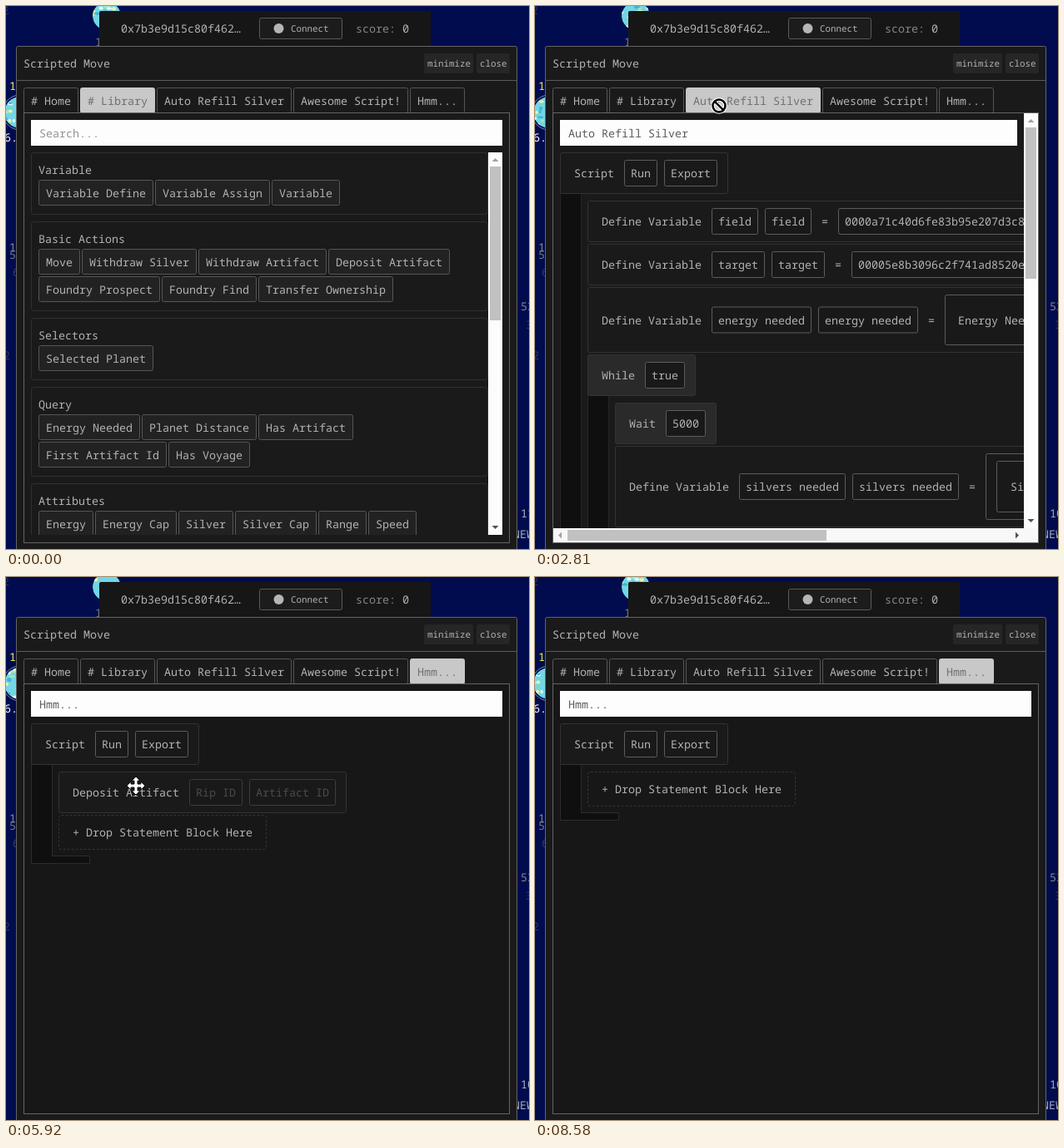
An HTML page for the animation above (8.74 s loop, 628 by 653 pixels).

```html
<!DOCTYPE html>
<html lang="en">
<head>
<meta charset="utf-8">
<title>Script panel</title>
<style>
  html, body { margin: 0; width: 100%; height: 100%; overflow: hidden; background: #000c4e; }
  svg { display: block; width: 628px; height: 653px; }
  text { font: 13.333px "Noto Sans Mono", "DejaVu Sans Mono", monospace; fill: #b2b2b2; text-rendering: geometricPrecision; }
  text.small { font-size: 10.83px; }
  .btn rect { fill: #222; stroke: #565656; }
  .tab rect { fill: #1a1a1a; stroke: #565656; }
  .tab.on rect { fill: #c8c8c8; stroke: #c8c8c8; }
  .tab.on text { fill: #707070; }
  .btn.on rect { fill: #969696; stroke: #969696; }
  .btn.on text { fill: #5a5a5a; }
  .tool rect { fill: #262626; }
  .tool.on rect { fill: #8f8f8f; }
  .tool.on text { fill: #4a4a4a; }
</style>
</head>
<body>
<svg id="stage" viewBox="0 0 628 653" xmlns="http://www.w3.org/2000/svg"></svg>
<script>
const LOOP = 8740;
const CHAR = 8;

const rect = (x, y, w, h, fill, more = '') =>
  `<rect x="${x}" y="${y}" width="${w}" height="${h}" fill="${fill}" ${more}/>`;
// Outlined box whose one-pixel border lies inside the given bounds.
const box = (x, y, w, h, fill, stroke, more = 'rx="2"') =>
  rect(x + .5, y + .5, w - 1, h - 1, fill, `stroke="${stroke}" ${more}`);
const label = (x, cy, str, fill, more = '') =>
  `<text x="${x}" y="${cy + 5}" ${fill ? `style="fill:${fill}"` : ''} ${more}>${str}</text>`;
const small = (x, cy, str) => `<text class="small" x="${x}" y="${cy + 4}">${str}</text>`;
const group = (id, body, more = '') => `<g id="${id}" ${more}>${body}</g>`;
const clip = (id, x, y, w, h) => `<clipPath id="${id}">${rect(x, y, w, h, '#000')}</clipPath>`;
const arrow = (x, y, angle, fill) =>
  `<path d="M-4 2L0-2L4 2Z" fill="${fill}" transform="translate(${x} ${y}) rotate(${angle})"/>`;

function seeded(seed) {
  return () => (seed = (seed * 16807) % 2147483647) / 2147483647;
}

// ---- Space background ----
const planets = [{ id: 'p1', x: 121, y: 12, r: 17 }, { id: 'p2', x: 17, y: 128, r: 19 }];

function planet({ id, x, y, r }, seed) {
  const rnd = seeded(seed);
  const colours = ['#f3f0a0', '#e8fbf4', '#3fb4d8', '#a8e8b8'];
  let blobs = '';
  for (let i = 0; i < 40; i++) {
    const bx = rnd() * 4 * r, by = y + (rnd() * 2 - 1) * r;
    const shape = `rx="${1.5 + rnd() * 3}" ry="${1 + rnd() * 1.6}" fill="${colours[i % 4]}"`;
    for (const shift of [0, 4 * r]) {
      blobs += `<ellipse cx="${x - r + bx - shift}" cy="${by}" ${shape}/>`;
    }
  }
  return `<clipPath id="${id}c"><circle cx="${x}" cy="${y}" r="${r}"/></clipPath>
    <g clip-path="url(#${id}c)"><circle cx="${x}" cy="${y}" r="${r}" fill="#72d6e4"/>${group(id, blobs)}</g>`;
}

const space = () => rect(0, 0, 628, 653, '#000c4e') +
  planet(planets[0], 71) + planet(planets[1], 389) +
  '<circle cx="17" cy="128" r="21" fill="none" stroke="#c8d4e8" stroke-opacity=".6"/>' +
  label(-5, 101, '.', '#fff') + label(4, 96, '11', '#f4f040') + label(-2, 158, '6.', '#fff') +
  label(-4, 5, '2', '#2b3357') + label(107, 43, '1', '#777') +
  label(4, 290, '11', '#8b8b86') + label(4, 299, '5', '#777') + label(8, 320, '6', '#333c5e') +
  label(-3, 420, '2', '#303858') + label(618, 361, '53', '#85858a') + label(624, 383, '3', '#303858') +
  label(618, 610, '11', '#a9adb5', 'id="count"') + label(609, 635, 'NEW', '#a9adb5');

const header = () => rect(112, 6, 398, 44, '#161616', 'rx="2"') +
  label(138, 27, '0x7b3e9d15c80f462…') +
  box(304, 14, 100, 26, '#1c1c1c', '#5a5a5a') +
  '<circle cx="327.5" cy="27" r="6" fill="#b5b5b5"/>' +
  small(342, 27, 'Connect') + label(420, 27, 'score:', '#858585') + label(476, 27, '0');

// ---- Window frame ----
const tabs = ['# Home', '# Library', 'Auto Refill Silver', 'Awesome Script!', 'Hmm...'];

function tabBar() {
  let x = 21;
  return tabs.map((name, i) => {
    const w = name.length * CHAR + 18;
    const body = `<path d="" />` + box(x, 98, w, 31, '') + label(x + 9, 114, name);
    x += w + 2 + (i === 0 || i === 2 ? 0 : 0);
    return group('tab' + i, body, 'class="tab"');
  }).join('');
}

const tool = (id, x, w, name) =>
  group(id, rect(x, 57, w, 24, '', 'rx="2"') + small(x + 4, 69, name), 'class="tool"');

const frame = () => box(12, 48, 602, 640, '#1a1a1a', '#646464') +
  rect(13, 89, 600, 1, '#5a5a5a') + label(21, 69, 'Scripted Move') +
  tool('minimize', 502, 59, 'minimize') + tool('close', 565, 40, 'close') +
  tabBar() + box(21, 128, 584, 518, '#171717', '#646464', '');

// ---- Library page ----
const library = [
  ['Variable', ['Variable Define', 'Variable Assign', 'Variable']],
  ['Basic Actions', ['Move', 'Withdraw Silver', 'Withdraw Artifact', 'Deposit Artifact'],
    ['Foundry Prospect', 'Foundry Find', 'Transfer Ownership']],
  ['Selectors', ['Selected Planet']],
  ['Query', ['Energy Needed', 'Planet Distance', 'Has Artifact'], ['First Artifact Id', 'Has Voyage']],
  ['Attributes', ['Energy', 'Energy Cap', 'Silver', 'Silver Cap', 'Range', 'Speed'], []]
];

function button(x, y, name) {
  const id = name.replace(/ /g, '');
  return group(id, box(x, y, name.length * CHAR + 18, 31, '') + label(x + 9, y + 16, name), 'class="btn"');
}

function libraryPage() {
  let y = 176, out = '';
  for (const [title, ...rows] of library) {
    const h = 42 + rows.length * 33;
    out += box(30, y, 549, h, '#1a1a1a', '#303030', 'rx="3"') + label(39, y + 21, title);
    rows.forEach((names, r) => {
      let x = 39;
      for (const name of names) {
        out += button(x, y + 33 + r * 33, name);
        x += name.length * CHAR + 20;
      }
    });
    y += h + 8;
  }
  return rect(22, 129, 582, 516, '#1a1a1a') + input(566, 'Search...', '#949494') +
    `<g clip-path="url(#listClip)">${out}</g>` +
    rect(579, 176, 17, 460, '#fcfcfc') + rect(581, 193, 13, 185, '#c1c1c1') +
    arrow(587.5, 185, 0, '#a0a0a0') + arrow(587.5, 627, 180, '#505050');
}

// ---- Script pages ----
const input = (w, value, fill = '#5c5c5c') => rect(30, 137, w, 31, '#fdfdfd') + label(40, 153, value, fill);

// Items in a row: plain words are labels, [name] is a field, [name, colour] a placeholder.
function statement(x, y, items, { fill = '#1a1a1a', width, h = 50 } = {}) {
  let cx = x + 13, body = '';
  const cy = y + h / 2;
  for (const item of items) {
    const isField = Array.isArray(item);
    const name = isField ? item[0] : item;
    const w = name.length * CHAR + (isField ? 16 : 8);
    if (isField) body += box(cx, cy - 16, w, 32, '#191919', item[1] ? '#3c3c3c' : '#5c5c5c');
    body += label(cx + (isField ? 8 : 4), cy, name, isField && item[1]);
    cx += w + 8;
  }
  return box(x, y, width || cx - 8 + 13 - x, h, fill, '#333') + body;
}

const scriptHead = () => statement(30, 176, ['Script', ['Run'], ['Export']]);

const foot = y => `<path d="M30.5 225.5H55.5V${y + .5}H100.5V${y + 9.5}H30.5Z" fill="#0f0f0f" stroke="#2c2c2c"/>`;

const dropZone = y => box(63, y, 250, 42, '#171717', '#343434', 'rx="3" stroke-dasharray="3 2"') +
  label(80, y + 21, '+ Drop Statement Block Here');

const emptyScript = () => foot(283) + scriptHead() + dropZone(234);

const filledScript = () => foot(335) + scriptHead() +
  statement(63, 234, ['Deposit Artifact', ['Rip ID', '#4a4a4a'], ['Artifact ID', '#4a4a4a']]) + dropZone(286);

function refillPage() {
  const define = (x, y, name, value, h) =>
    statement(x, y, ['Define Variable', [name], [name], '=', ...value], { width: 600, h });
  const bar = (x, y) => box(x, y, 26, 420, '#0f0f0f', '#262626', '');
  const body = rect(22, 129, 582, 516, '#1a1a1a') + bar(30, 225) + scriptHead() +
    define(63, 234, 'field', [['0000a71c40d6fe83b95e207d3c8145']]) +
    define(63, 286, 'target', [['00005e8b3096c2f741ad8520e9']]) +
    define(63, 338, 'energy needed', [], 79) +
    box(492, 347, 200, 61, '#191919', '#5c5c5c') + label(508, 378, 'Energy Needed') +
    bar(63, 468) + statement(63, 419, ['While', ['true']], { fill: '#2a2a2a' }) +
    statement(96, 477, ['Wait', ['5000']], { fill: '#2a2a2a' }) +
    define(96, 529, 'silvers needed', [], 98) +
    box(541, 538, 200, 80, '#191919', '#5c5c5c') + box(554, 547, 200, 62, '#191919', '#5c5c5c') +
    label(571, 578, 'Silver Cap');
  return `<g clip-path="url(#pageClip)">${body}</g>` + input(549, tabs[2]) +
    rect(587, 129, 17, 516, '#fcfcfc') + rect(22, 628, 582, 17, '#f8f8f8') +
    rect(589, 146, 13, 182, '#c1c1c1') + rect(39, 630, 311, 13, '#c1c1c1') +
    arrow(595.5, 138, 0, '#a0a0a0') + arrow(595.5, 619, 180, '#505050') +
    arrow(30, 636.5, -90, '#a0a0a0') + arrow(579, 636.5, 90, '#505050');
}

// ---- Pointer ----
const arm = 'L2-2V-6H5L0-11L-5-6H-2V-2';
const cross = 'M-2-2V-6H-5L0-11L5-6H2V-2H6V-5L11 0L6 5V2H2V6H5L0 11L-5 6H-2V2H-6V5L-11 0L-6-5V-2Z';
const ban = 'M-5.2-5.2L5.2 5.2M7.5 0A7.5 7.5 0 1 1-7.5 0A7.5 7.5 0 1 1 7.5 0';
const hand = 'M-2 1Q0-1 2 1V8Q4 7 5 9Q7 8 8 10Q10 9 11 11V16Q10 19 9 21H0Q-1 18-6 13Q-6 10-3 11L-2 12Z';

const pointers = () =>
  group('move', `<path d="${cross}" fill="#fff" stroke="#111"/>`) +
  group('ban', `<path d="${ban}" fill="none" stroke="#fff" stroke-width="4.6"/>
    <path d="${ban}" fill="none" stroke="#000" stroke-width="2.5"/>`) +
  group('hand', `<path d="${hand}" fill="#fff" stroke="#111"/><path d="M2 8V12M5 9V12M8 10V12" stroke="#111"/>`);

const track = [
  [1450, -20, 294], [1780, 270, 289], [1960, 408, 310], [2260, 408, 310], [2480, 345, 240],
  [2740, 221, 120], [3080, 221, 120], [3440, 385, 112], [3800, 400, 112], [4130, 512, 115],
  [4460, 512, 116], [4660, 408, 158], [4760, 358, 198], [4980, 165, 255], [5300, 160, 255],
  [5600, 156, 251], [5960, 156, 251], [6240, 300, 425], [6420, 300, 425], [6700, 527, 67],
  [6960, 527, 67], [7210, 545, -30]
];
const pointerSteps = [[0, ''], [1450, 'move'], [2320, 'ban'], [4920, 'move'], [6020, 'ban'], [6290, 'hand'], [7220, '']];
const pageSteps = [[0, 1], [2780, 2], [3500, 3], [4190, 4]];

const stepAt = (steps, t) => steps.filter(([start]) => start <= t).pop()[1];
const between = (t, a, b) => t >= a && t < b;

function positionAt(t) {
  const i = track.findIndex(([end]) => end > t);
  if (i <= 0) return (i ? track[track.length - 1] : track[0]).slice(1);
  const [t0, x0, y0] = track[i - 1], [t1, x1, y1] = track[i];
  const u = (t - t0) / (t1 - t0), k = u * u * (3 - 2 * u);
  return [x0 + (x1 - x0) * k, y0 + (y1 - y0) * k];
}

// ---- Assembly ----
const stage = document.getElementById('stage');
stage.innerHTML = clip('listClip', 30, 176, 549, 460) + clip('pageClip', 22, 129, 565, 499) +
  space() + header() + frame() +
  group('library', libraryPage()) + group('refill', refillPage()) +
  group('empty', emptyScript()) + group('filled', filledScript()) +
  group('field', input(566, '')) + group('pointer', pointers());

const $ = id => document.getElementById(id);
const show = (id, on) => { $(id).style.display = on ? '' : 'none'; };
const light = (id, on) => $(id).classList.toggle('on', on);

function update(t) {
  const page = stepAt(pageSteps, t);
  const filled = between(t, 5040, 6290);
  tabs.forEach((_, i) => light('tab' + i, i === page));
  show('library', page === 1);
  show('refill', page === 2);
  show('empty', page > 2 && !filled);
  show('filled', page > 2 && filled);
  show('field', page > 2);
  $('field').querySelector('text').textContent = tabs[page];
  light('DepositArtifact', between(t, 1920, 2780));
  light('minimize', between(t, 6650, 7020));
  $('count').textContent = t < 1300 ? '11' : '10';

  planets.forEach(({ id, r }) => {
    $(id).setAttribute('transform', `translate(${4 * r * t / LOOP} 0)`);
  });

  const kind = stepAt(pointerSteps, t);
  for (const id of ['move', 'ban', 'hand']) show(id, id === kind);
  $('pointer').setAttribute('transform', `translate(${positionAt(t).map(Math.round).join(' ')})`);
}

const start = performance.now();
function tick() {
  update((performance.now() - start) % LOOP);
  requestAnimationFrame(tick);
}
tick();
</script>
</body>
</html>
```
